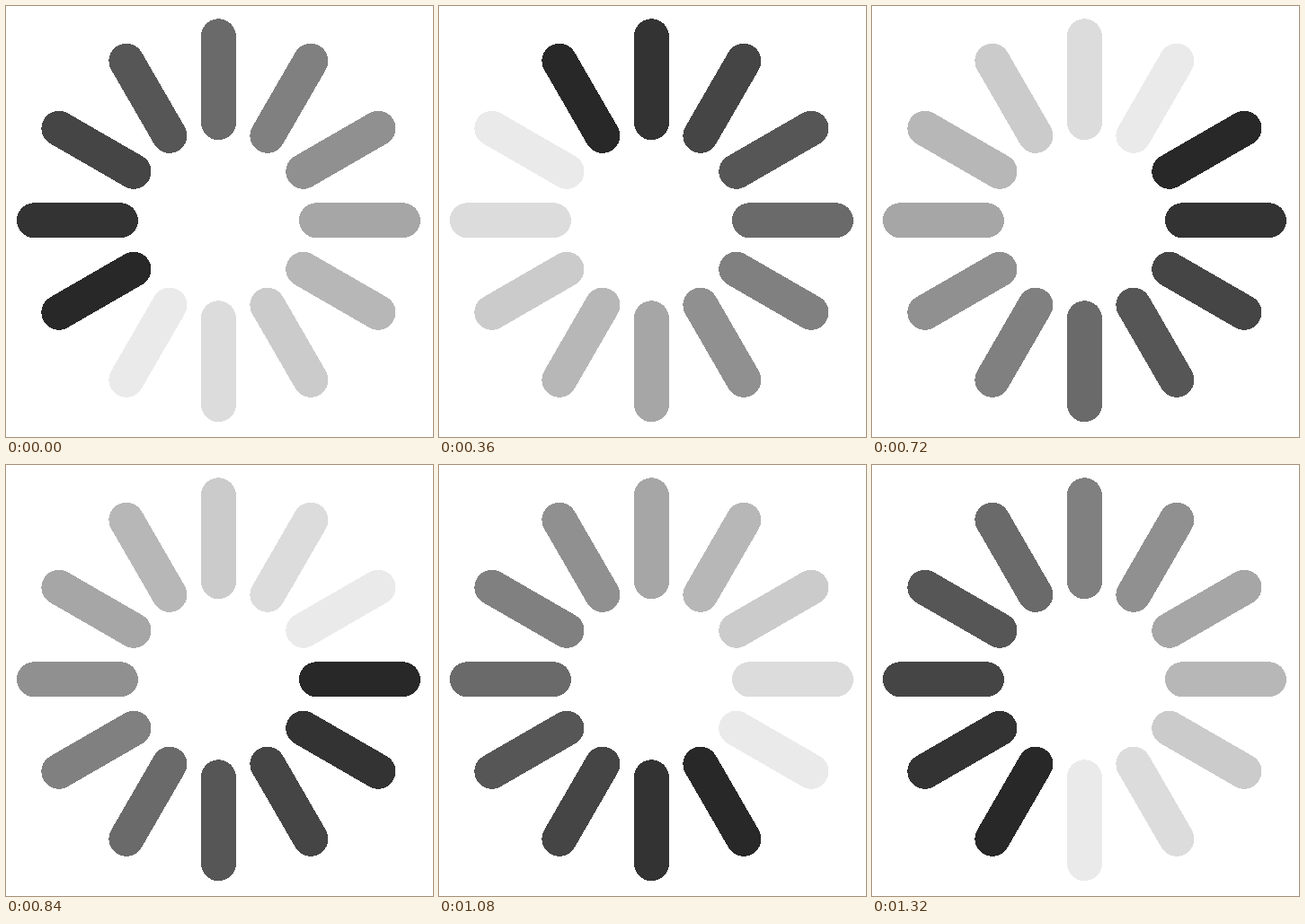
Recreate the animation shown at these times as an HTML page. Size 475 px wide and 480 px high, loop 1.44 s.

```html
<!DOCTYPE html>
<html lang="en">
<head>
<meta charset="utf-8">
<title>Spinner</title>
<style>
  html, body { margin: 0; width: 100%; height: 100%; overflow: hidden; background: #fff; }
  svg { display: block; }
  line { stroke-width: 39; stroke-linecap: round; shape-rendering: crispEdges; }
</style>
</head>
<body>
<svg width="475" height="480"><g id="spokes" transform="translate(236.4 238.75)"></g></svg>
<script>
const COUNT = 12, STEP = 120, START = 8;
// Grey levels, clockwise from the darkest spoke
const greys = [40, 51, 69, 86, 106, 128, 144, 166, 183, 203, 220, 234];
const group = document.getElementById('spokes');

const spokes = greys.map((_, i) => {
  const line = document.createElementNS('http://www.w3.org/2000/svg', 'line');
  line.setAttribute('y1', -109);
  line.setAttribute('y2', -205);
  line.setAttribute('transform', `rotate(${i * 360 / COUNT})`);
  return group.appendChild(line);
});

let shown = -1;
function draw(time) {
  const head = (START + Math.floor(time / STEP)) % COUNT;
  if (head === shown) return;
  shown = head;
  spokes.forEach((spoke, i) => {
    const g = greys[(i - head + COUNT) % COUNT];
    spoke.setAttribute('stroke', `rgb(${g},${g},${g})`);
  });
}

const begin = performance.now();
function tick(now) {
  draw(Math.max(0, now - begin));
  requestAnimationFrame(tick);
}
draw(0);
requestAnimationFrame(tick);
</script>
</body>
</html>
```
